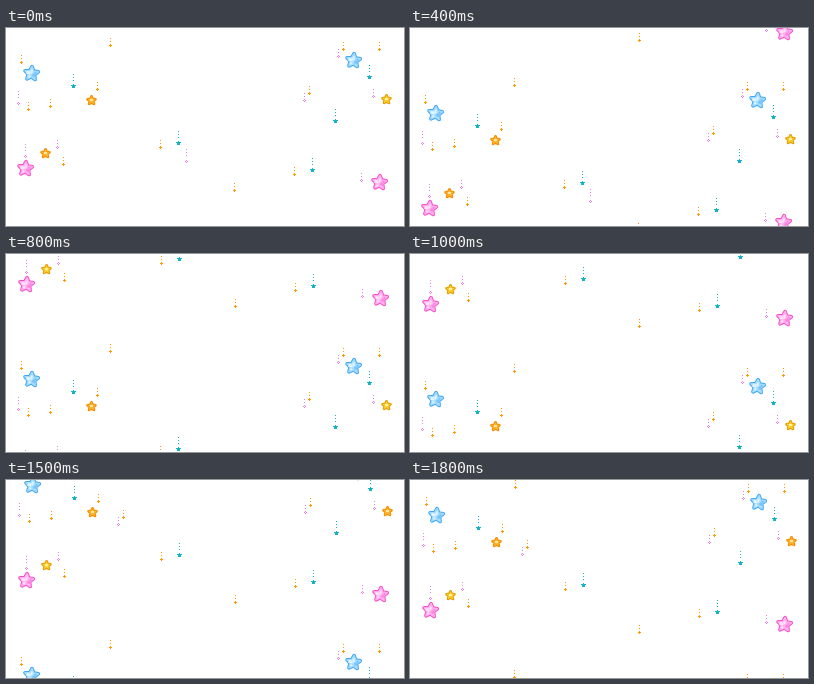
Animation of 398x198 px, one loop 1.9 s. Source, as an HTML page with a canvas:

```html
<!DOCTYPE html>
<html lang="en">
<head>
<meta charset="utf-8">
<title>Falling stars</title>
<style>
  html, body { margin: 0; width: 100%; height: 100%; overflow: hidden; background: #fff; }
  canvas { display: block; width: 398px; height: 198px; }
</style>
</head>
<body>
<canvas id="sky" width="398" height="198"></canvas>
<script>
const ctx = document.getElementById('sky').getContext('2d');
const STEP_MS = 100, STEPS = 19, FALL = 10, PERIOD = STEPS * FALL;

const ORANGE = '#ff9900', PINK = '#e67fe8', TEAL = '#14b4c4';
const BLUE_STAR = { line: '#3fa8f4', fill: '#a6dcff', light: '#e2f5ff', shade: '#74c4fb' };
const PINK_STAR = { line: '#f84fc8', fill: '#ffb0ee', light: '#ffe2f8', shade: '#ff86de' };
const ORANGE_STAR = { line: '#f58a00', fill: '#ffb52e', light: '#ffe9a8' };
const YELLOW_STAR = { line: '#e09a00', fill: '#ffd02e', light: '#fff3a8' };

const pluses = [
  [104, 17], [15, 34], [22, 81], [44, 78], [91, 61], [154, 119], [57, 136],
  [228, 162], [288, 146], [337, 21], [373, 21], [303, 65]
];
// x, y, trail length
const rings = [
  [12, 75, 12], [19, 128, 12], [51, 119, 7], [355, 152, 7],
  [298, 72, 7], [332, 28, 7], [367, 68, 7]
];
const sparks = [[67, 58], [172, 115], [363, 49], [329, 93], [306, 142]];
// x, y, tone on the lower sheet, tone on the sheet that follows it
const smallStars = [
  [85, 72, ORANGE_STAR, ORANGE_STAR],
  [39, 125, ORANGE_STAR, YELLOW_STAR],
  [380, 71, YELLOW_STAR, ORANGE_STAR]
];
const bigStars = [
  [25, 45, BLUE_STAR], [347, 32, BLUE_STAR], [19, 140, PINK_STAR], [373, 154, PINK_STAR]
];

function dot(x, y, w = 1, h = 1) { ctx.fillRect(x, y, w, h); }

function trail(x, y, length) {
  for (let d = length; d > 3; d -= 3) dot(x, y - d);
}

function drawPlus(x, y) {
  ctx.fillStyle = ORANGE;
  trail(x, y, 7);
  dot(x - 1, y, 3, 1);
  dot(x, y - 1, 1, 3);
}

function drawRing(x, y, length) {
  ctx.fillStyle = PINK;
  trail(x, y, length);
  dot(x - 1, y);
  dot(x + 1, y);
  dot(x, y - 1);
  dot(x, y + 1);
}

function drawSpark(x, y) {
  ctx.fillStyle = TEAL;
  trail(x, y, 12);
  dot(x, y - 2);
  dot(x - 2, y - 1, 5, 1);
  dot(x - 1, y, 3, 2);
}

function starPath(outer, inner) {
  ctx.beginPath();
  for (let i = 0; i < 10; i++) {
    const a = i * Math.PI / 5 - Math.PI / 2, r = i % 2 ? inner : outer;
    ctx.lineTo(r * Math.cos(a), r * Math.sin(a));
  }
  ctx.closePath();
}

function outline(color, width) {
  ctx.strokeStyle = color;
  ctx.lineWidth = width;
  ctx.stroke();
}

function drawStar(x, y, tone, big) {
  ctx.save();
  ctx.translate(x + 0.5, y + 0.5);
  ctx.lineJoin = 'round';
  if (big) {
    ctx.rotate(0.08);
    starPath(7, 3.3);
    outline(tone.line, 3.6);
    outline(tone.fill, 1.6);
  } else {
    starPath(4.2, 2);
    outline(tone.line, 2.6);
    outline(tone.fill, 0.6);
  }
  ctx.fillStyle = tone.fill;
  ctx.fill();
  ctx.fillStyle = tone.light;
  if (big) {
    dot(-5, -2, 4, 3);
    dot(-1, -4, 2, 4);
    dot(-3, 2, 2, 2);
    ctx.fillStyle = tone.shade;
    dot(1, 0, 3, 3);
    dot(3, -2, 2, 2);
  } else {
    dot(-1.5, -1.5, 3, 2);
  }
  ctx.restore();
}

function drawSheet(dx, dy, sheet) {
  for (const [x, y] of pluses) drawPlus(x + dx, y + dy);
  for (const [x, y, length] of rings) drawRing(x + dx, y + dy, length);
  for (const [x, y] of sparks) drawSpark(x + dx, y + dy);
  for (const s of smallStars) drawStar(s[0] + dx, s[1] + dy, s[2 + sheet], false);
  for (const [x, y, tone] of bigStars) drawStar(x + dx, y + dy, tone, true);
  // these two pieces differ between the sheets
  if (sheet === 0) {
    drawRing(180 + dx, 133 + dy, 12);
  } else {
    drawPlus(116 + dx, 77 + dy);
    drawRing(111 + dx, 84 + dy, 7);
  }
}

function render(time) {
  const drop = Math.floor(time / STEP_MS) % STEPS * FALL;
  ctx.fillStyle = '#fff';
  ctx.fillRect(0, 0, 398, 198);
  drawSheet(0, drop, 0);
  drawSheet(1, drop - PERIOD, 1);
}

const start = performance.now();
function tick() {
  render(performance.now() - start);
  requestAnimationFrame(tick);
}
tick();
</script>
</body>
</html>
```
